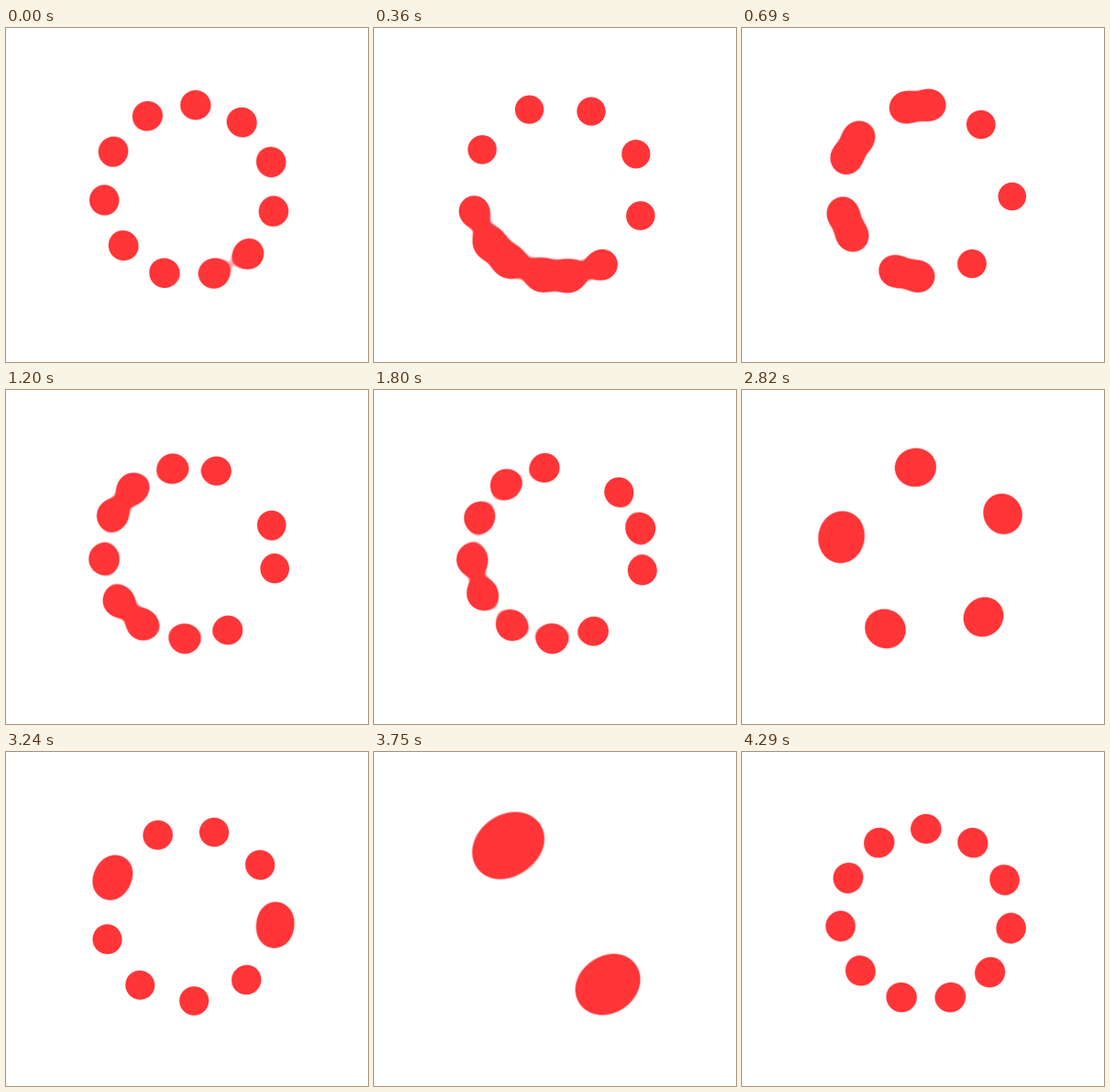
An HTML page with a canvas for the animation above (4320 ms loop, 395 by 365 pixels).

```html
<!DOCTYPE html>
<html lang="en">
<head>
<meta charset="utf-8">
<title>Gooey ring loader</title>
<style>
  html, body { margin: 0; width: 100%; height: 100%; overflow: hidden; background: #fff; }
  canvas { display: block; }
</style>
</head>
<body>
<canvas id="stage" width="395" height="365"></canvas>
<script>
const STEP = 30, STEPS = 144;
const DOTS = 11, RING = 94.4, SIZE = 14.3;
const CENTER = { x: 200.7, y: 178 };
const BASE = 130.6;                 // clockwise degrees from the top
const BOX = { x: 60, y: 36, w: 280, h: 284 };
const RED = [255, 53, 56];

// Angle between consecutive dots: [step, degrees]
const SPREAD = [
  [0, 33.31], [23, 53.85], [40, 82.55], [54, 103.5], [60, 110.46], [73, 123],
  [90, 142.6], [94, 145], [108, 160.95], [127, 184.3], [143, 196.48], [144, 196.94]
];

const rates = SPREAD.slice(1).map(([n, v], i) => (v - SPREAD[i][1]) / (n - SPREAD[i][0]));
const slopes = SPREAD.map((_, i) => {
  if (i === 0 || i === rates.length) return 0.46;
  const a = rates[i - 1], b = rates[i];
  return 2 * a * b / (a + b);
});

// Monotone cubic through the table
function spreadAt(n) {
  let i = 0;
  while (i < rates.length - 1 && n >= SPREAD[i + 1][0]) i++;
  const [n0, v0] = SPREAD[i], [n1, v1] = SPREAD[i + 1];
  const h = n1 - n0, u = (n - n0) / h, w = 1 - u;
  return v0 * (1 + 2 * u) * w * w + v1 * u * u * (3 - 2 * u)
    + h * u * w * (slopes[i] * w - slopes[i + 1] * u);
}

const ctx = document.getElementById('stage').getContext('2d');
const image = ctx.createImageData(BOX.w, BOX.h);
const pixels = image.data;

function dotsAt(n) {
  const spread = spreadAt(n);
  return Array.from({ length: DOTS }, (_, i) => {
    const a = (BASE + (i + 1) * spread) * Math.PI / 180;
    return [CENTER.x + RING * Math.sin(a), CENTER.y - RING * Math.cos(a)];
  });
}

// Metaballs: filled where the summed field exceeds 1
function draw(n) {
  const dots = dotsAt(n);
  let p = 0;
  for (let y = 0; y < BOX.h; y++) {
    const py = BOX.y + y + 0.5;
    for (let x = 0; x < BOX.w; x++, p += 4) {
      const px = BOX.x + x + 0.5;
      let field = 0;
      for (const [dx, dy] of dots) {
        const ex = px - dx, ey = py - dy;
        field += SIZE * SIZE / (ex * ex + ey * ey + 0.01);
      }
      const cover = Math.min(1, Math.max(0, (field - 1) * 9 + 0.5));
      for (let k = 0; k < 3; k++) pixels[p + k] = 255 + (RED[k] - 255) * cover;
      pixels[p + 3] = 255;
    }
  }
  ctx.putImageData(image, BOX.x, BOX.y);
}

let shown = -1;
const start = performance.now();
function tick() {
  const n = Math.floor((performance.now() - start) / STEP) % STEPS;
  if (n !== shown) draw(shown = n);
  requestAnimationFrame(tick);
}
tick();
</script>
</body>
</html>
```
